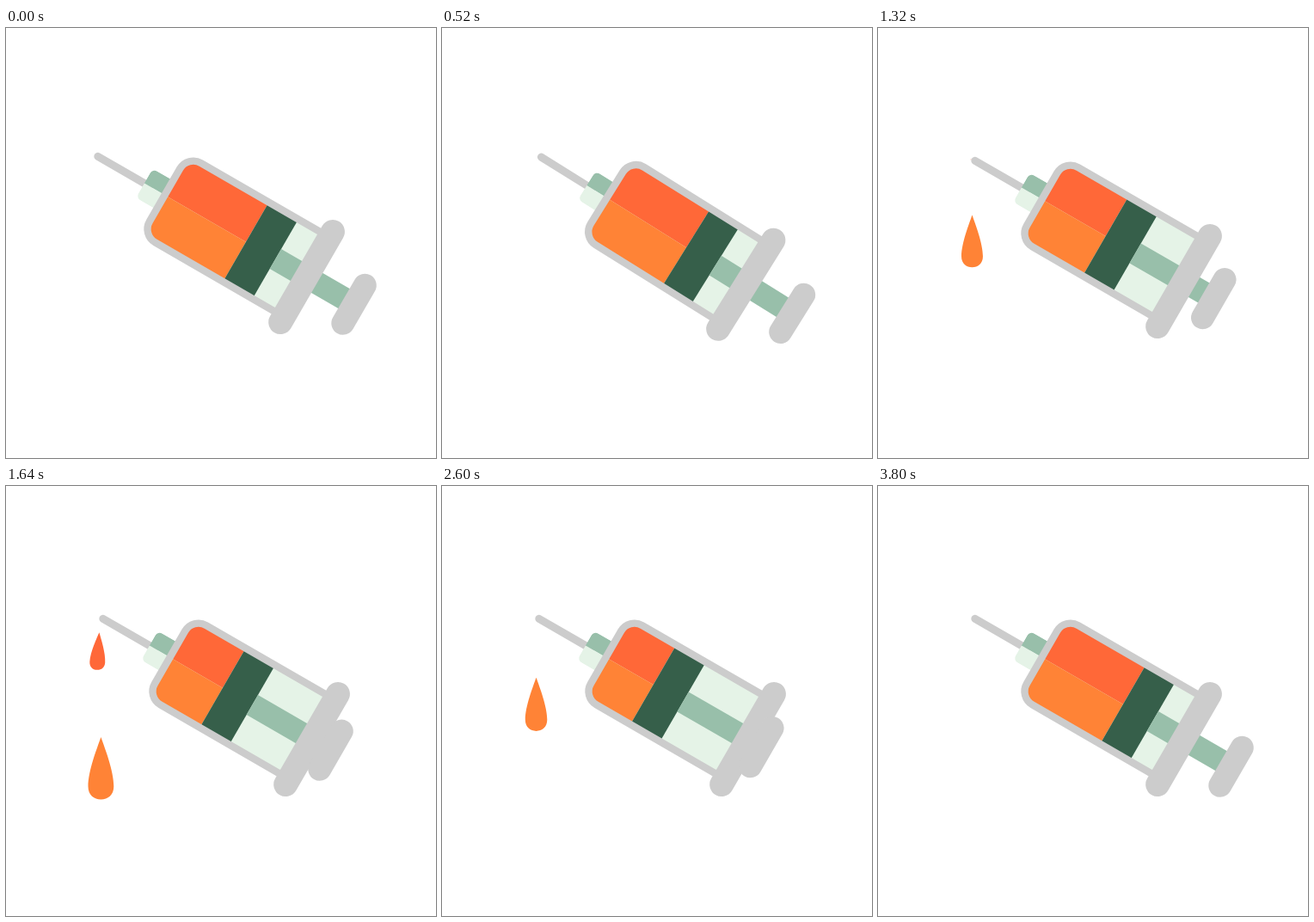
Write an HTML page with a canvas that moves like this. It is 500 px wide and 500 px high and loops after 3840 ms.

```html
<!DOCTYPE html>
<html lang="en">
<head>
<meta charset="utf-8">
<title>Syringe</title>
<style>
  html, body { margin: 0; width: 100%; height: 100%; overflow: hidden; background: #fff; }
  canvas { display: block; }
</style>
</head>
<body>
<canvas id="stage" width="500" height="500"></canvas>
<script>
const ctx = document.getElementById('stage').getContext('2d');
const LOOP = 3840, STEP = 40;
const GRAY = '#cccccc', GREEN = '#98bfaa', PALE = '#e5f3e7', DARK = '#365f4a';
const RED = '#ff6838', ORANGE = '#ff8336';

const DROP_TIME = 943, GROW_TIME = 130;
const drops = [
  { start: 906, color: ORANGE, drift: 2.7, end: 1849 },
  { start: 1442, color: RED, drift: 0.5, end: 2385 },
  { start: 2165, color: ORANGE, drift: 2.7, end: 2780 }
];

const clamp = x => Math.max(0, Math.min(1, x));
// Smooth ease in and out between two times, from 0 to 1
const ease = (t, from, to) => {
  const x = clamp((t - from) / (to - from));
  return x * x * (3 - 2 * x);
};

function rect(x, y, w, h, color) {
  ctx.fillStyle = color;
  ctx.fillRect(x, y, w, h);
}

function bar(x1, y1, x2, y2, width) {
  ctx.strokeStyle = GRAY;
  ctx.lineCap = 'round';
  ctx.lineWidth = width;
  ctx.beginPath();
  ctx.moveTo(x1, y1);
  ctx.lineTo(x2, y2);
  ctx.stroke();
}

function clipped(x, y, w, h, radii, draw) {
  ctx.save();
  ctx.beginPath();
  ctx.roundRect(x, y, w, h, radii);
  ctx.clip();
  draw();
  ctx.restore();
}

function drawDrop(t, { start, color, drift, end }) {
  const age = t - start;
  if (age < -GROW_TIME || t >= end) return;
  const p = clamp(age / DROP_TIME);
  const grown = (age + GROW_TIME) / (DROP_TIME + GROW_TIME);
  const length = 74 * (1 - (1 - grown) ** 2.45);
  const tilt = 22 * Math.max(0, 1 - p / 0.35) ** 2;

  ctx.save();
  ctx.translate(108.3 + drift * p, 152 + 160 * ease(p, 0, 1));
  ctx.rotate(tilt * Math.PI / 180);
  ctx.scale(length, length);
  ctx.fillStyle = color;
  ctx.beginPath();
  ctx.moveTo(0, 0);
  ctx.bezierCurveTo(0.06, 0.17, 0.205, 0.54, 0.205, 0.79);
  ctx.bezierCurveTo(0.205, 0.93, 0.11, 1, 0, 1);
  ctx.bezierCurveTo(-0.11, 1, -0.205, 0.93, -0.205, 0.79);
  ctx.bezierCurveTo(-0.205, 0.54, -0.06, 0.17, 0, 0);
  ctx.fill();
  ctx.restore();
}

// The syringe lies along the x axis, its pivot at the origin
function drawSyringe(t) {
  const settle = ease(t, 0, 340);
  const angle = 30 + 22 * (settle - ease(t, 340, 560));
  const push = 45.3 * (ease(t, 630, 1980) - ease(t, 2860, 3510));
  const piston = 49.5 - push, handle = 194.5 - push;

  ctx.save();
  ctx.translate(236.1 + 6 * settle, 224 + 5 * settle);
  ctx.rotate(angle * Math.PI / 180);

  bar(-149.3, 0, -80, 0, 9);
  clipped(-87, -19.5, 30, 39, [6, 0, 0, 6], () => {
    rect(-87, -19.5, 30, 19.5, GREEN);
    rect(-87, 0, 30, 19.5, PALE);
  });

  clipped(-59.5, -53.3, 192, 106.6, [18, 0, 0, 18], () => {
    rect(-60, -54, 193, 108, PALE);
    rect(-60, -54, piston + 60, 54, RED);
    rect(-60, 0, piston + 60, 54, ORANGE);
    rect(piston, -54, 39.7, 108, DARK);
  });
  rect(piston + 39.7, -13.3, handle - piston - 39.7, 26.6, GREEN);

  ctx.lineWidth = 8.4;
  ctx.strokeStyle = GRAY;
  ctx.beginPath();
  ctx.roundRect(-59.5, -53.3, 190.5, 106.6, [18, 0, 0, 18]);
  ctx.stroke();

  bar(131, -60.7, 131, 60.7, 28);
  bar(handle, -25.5, handle, 25.5, 27);
  ctx.restore();
}

function frame(now) {
  const t = Math.floor(now % LOOP / STEP) * STEP;
  rect(0, 0, 500, 500, '#fff');
  drops.forEach(drop => drawDrop(t, drop));
  drawSyringe(t);
}

const origin = performance.now();
function tick() {
  frame(performance.now() - origin);
  requestAnimationFrame(tick);
}
tick();
</script>
</body>
</html>
```
